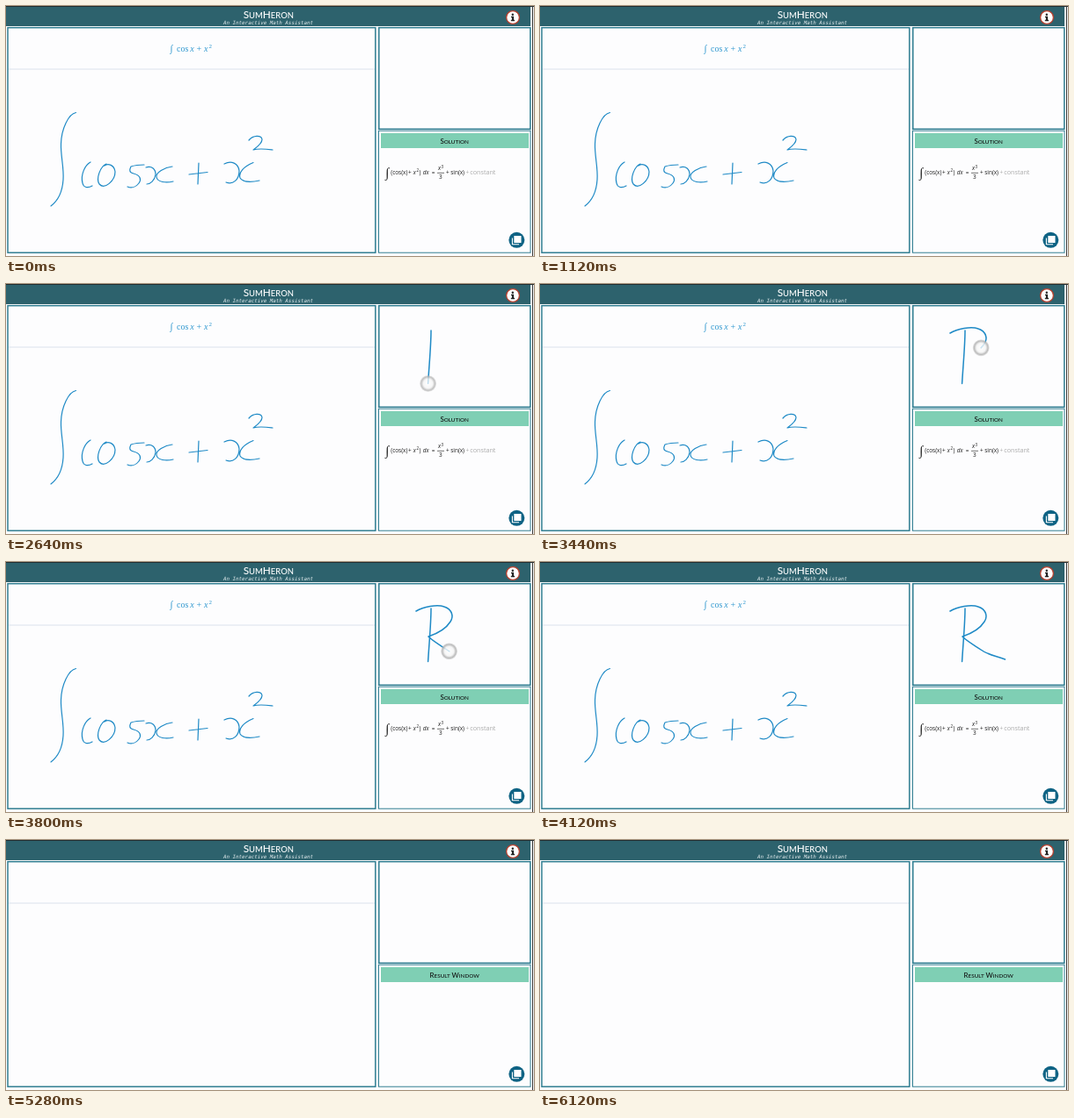
Recreate the animation shown at these times as an HTML page. Size 600 px wide and 285 px high, loop 6.4 s.

```html
<!DOCTYPE html>
<html lang="en">
<head>
<meta charset="utf-8">
<title>Math assistant</title>
<style>
html, body { margin: 0; width: 100%; height: 100%; overflow: hidden; background: #fdfdfe; }
svg { display: block; width: 600px; height: 285px; }
.caps { font-family: Lato, Carlito, sans-serif; font-weight: 500; text-anchor: middle; }
.ink { fill: none; stroke: #1f8ac6; stroke-width: 1.2; stroke-linecap: round; stroke-linejoin: round; }
.stroke { stroke-width: 1.5; }
.tex { font: 10px "Liberation Serif", serif; fill: #2f97cf; }
.math { font: 6.4px "Open Sans", sans-serif; fill: #1c1c1c; }
.it { font-style: italic; }
.panel { fill: #fdfdfe; stroke: #2f7d91; stroke-width: 1.5; }
</style>
</head>
<body>
<svg viewBox="0 0 600 285">
  <defs>
    <radialGradient id="glow">
      <stop offset="0" stop-color="#fff" stop-opacity=".75"/>
      <stop offset=".55" stop-color="#f4f4f4" stop-opacity=".85"/>
      <stop offset=".82" stop-color="#b4b4b4" stop-opacity=".9"/>
      <stop offset="1" stop-color="#bbb" stop-opacity=".3"/>
    </radialGradient>
  </defs>

  <rect width="596" height="23" fill="#2d626d"/>
  <rect width="600" height="1" fill="#222d30"/>
  <rect x="598" width="1" height="285" fill="#333"/>
  <text class="caps" id="title" x="298.3" y="14.2" font-size="11.8" fill="#fff"></text>
  <text x="298" y="21" text-anchor="middle" font-family="'DejaVu Sans Mono', monospace" font-size="5.85" font-style="italic" fill="#e4edef">An Interactive Math Assistant</text>

  <circle cx="576" cy="13" r="7.4" fill="#fff" stroke="#b5402f" stroke-width="1.3"/>
  <g fill="#222"><circle cx="575.8" cy="9.7" r="1.2"/><path d="M574 11.8h3v4h1v1.4h-4.2v-1.4h1.1v-2.6H574z"/></g>

  <rect class="panel" x="2" y="24.7" width="417.8" height="256.5"/>
  <path d="M3 72H419" stroke="#dbe1ec"/>
  <rect class="panel" x="423.8" y="24.7" width="172" height="115.6"/>
  <rect class="panel" x="423.5" y="142.2" width="172.5" height="139" style="stroke-width:1"/>
  <rect x="426" y="145" width="168" height="17" fill="#7fcfb4"/>
  <text class="caps" id="heading" x="509.7" y="156.8" font-size="7.9" fill="#111"></text>

  <circle cx="580.3" cy="266.8" r="9" fill="#0f6384"/>
  <path d="M575.4 264.5V271.8H583" fill="none" stroke="#fff" stroke-width="1.1"/>
  <rect x="577.3" y="262" width="8.2" height="8" rx=".6" fill="#fff"/>

  <g id="work">
    <g class="tex">
      <text x="186.5" y="51.5" font-size="11">∫</text>
      <text x="194" y="51.5">cos</text>
      <text class="it" x="209.2" y="51.5">x</text>
      <text x="216.5" y="51.5">+</text>
      <text class="it" x="225" y="51.5">x</text>
      <text x="230.5" y="48" style="font-size:7px">2</text>
    </g>
    <g class="ink">
      <path d="M79.5 121.5C71 123 63 140 62.5 157C62 171 66 184 65 198C64 213 59 222 51 228"/>
      <path d="M96 178C90 181 84.5 192 87 202C88 207 93 208 98 205"/>
      <path d="M114 180C107 183 102 197 106 203C112 210 124 199 124 189C123 181 116 179 112 182"/>
      <path d="M157 181C150 181 145 182 142 183C140 187 140 190 145 191C153 193 154 198 151 202C148 206 143 208 138 206"/>
      <path d="M159 184C166 182 170 186 170 192C169 199 164 203 160 203M189 183C180 184 170 190 171 195C172 201 182 202 190 200"/>
      <path d="M219 179L218 203M208 192L229 189.5"/>
      <path d="M248 180C256 176 264 179 265 188C265 198 258 204 250 201M281 178.5C270 183 264 190 266 196C269 201 279 201 288 199"/>
      <path d="M276 153C281 147 290 147 291 152C291 157 285 161 281 164C288 162 295 163 303 164"/>
    </g>
    <g class="math">
      <text x="431" y="195" style="font:15px 'Liberation Serif',serif">∫</text>
      <text x="437.3" y="192">(cos(x)</text>
      <text x="457" y="192">+</text>
      <text class="it" x="462.8" y="192">x</text>
      <text x="466.5" y="189" style="font-size:4.6px">2</text>
      <text x="469.5" y="192">)</text>
      <text class="it" x="473.8" y="192">dx</text>
      <text x="483.7" y="192">=</text>
      <text class="it" x="491" y="187.4">x</text>
      <text x="494.5" y="184.6" style="font-size:4.6px">3</text>
      <path d="M490 190.3H498" stroke="#333" stroke-width=".7"/>
      <text x="492" y="197.3">3</text>
      <text x="500" y="192">+</text>
      <text x="505.3" y="192">sin(x)</text>
      <text x="522.5" y="192" fill="#aaa">+</text>
      <text x="527.3" y="192" fill="#aaa" style="font-size:7.2px">constant</text>
    </g>
    <path class="ink stroke" d="M483 53C483 70 481 90 479.6 113.5"/>
    <path class="ink stroke" d="M466 56C474 51 490 48 498 51C507 54 509 62 505 68C500 76 489 82 480 85C485 90 492 94 501 100C509 106 518 107 528.5 111"/>
    <circle id="touch" r="9.5" fill="url(#glow)"/>
  </g>
</svg>
<script>
const LOOP = 6400, CLEAR = 5040, FADE = 140;
const $ = id => document.getElementById(id);
const work = $("work"), heading = $("heading"), touch = $("touch");

// Pairs of time and drawn share of each pen stroke
const keys = [
  [[2400, 0], [2630, 1]],
  [[3040, 0], [3440, .43], [3640, .62], [3800, .81], [3960, 1]]
];
const strokes = [...document.querySelectorAll(".stroke")].map((path, i) =>
  ({ path, keys: keys[i], length: path.getTotalLength() }));

function setCaps(node, text) {
  node.innerHTML = text.replace(/[a-z]+/g, s =>
    `<tspan style="font-size:.8em">${s.toUpperCase()}</tspan>`);
}

function progress(keys, t) {
  if (t <= keys[0][0]) return 0;
  for (let i = 1; i < keys.length; i++) {
    const [t0, p0] = keys[i - 1], [t1, p1] = keys[i];
    if (t < t1) return p0 + (p1 - p0) * (t - t0) / (t1 - t0);
  }
  return 1;
}

function draw(t) {
  const solved = t < CLEAR;
  work.style.display = solved ? "" : "none";
  setCaps(heading, solved ? "Solution" : "Result Window");
  let alpha = 0;
  for (const { path, keys, length } of strokes) {
    const start = keys[0][0], end = keys[keys.length - 1][0];
    const drawn = length * progress(keys, t);
    path.style.visibility = t < start ? "hidden" : "visible";
    path.style.strokeDasharray = `${drawn} ${length + 9}`;
    if (t >= start && t < end + FADE) {
      const p = path.getPointAtLength(drawn);
      touch.setAttribute("transform", `translate(${p.x} ${p.y})`);
      alpha = Math.min(1, 1 - (t - end) / FADE);
    }
  }
  touch.style.opacity = alpha;
}

setCaps($("title"), "SumHeron");
const begin = performance.now();
function frame() {
  draw((performance.now() - begin) % LOOP);
  requestAnimationFrame(frame);
}
frame();
</script>
</body>
</html>
```
